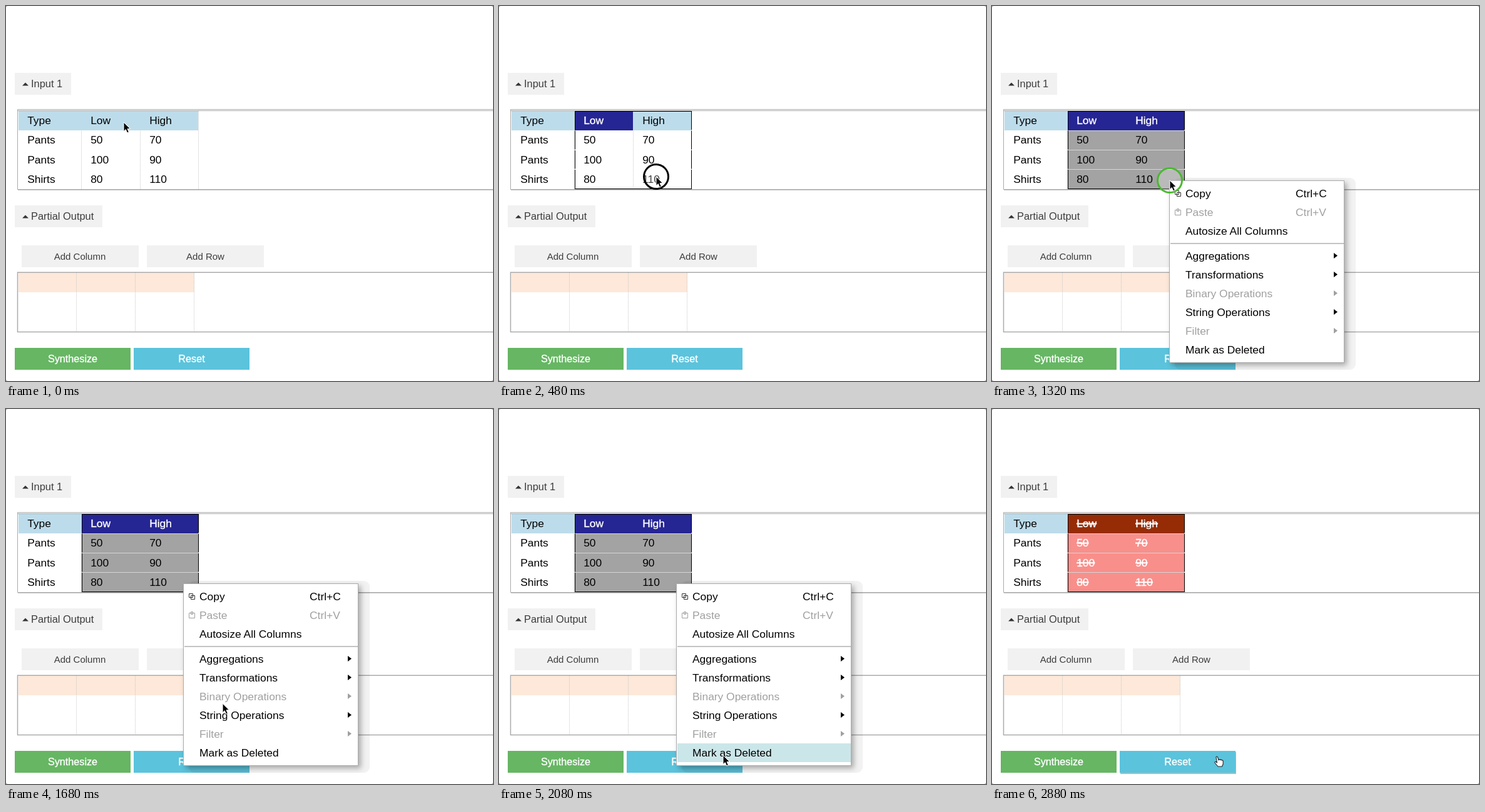
An HTML page that plays this animation: 778 by 600 pixels, repeating every 2.92 s.

```html
<!DOCTYPE html>
<html lang="en">
<head>
<meta charset="utf-8">
<title>Mark columns as deleted</title>
<style>
html, body { margin: 0; width: 100%; height: 100%; overflow: hidden; background: #fff; }
svg { display: block; width: 778px; height: 600px; font: 17.4px "Liberation Sans", Arial, sans-serif; }
.label { font-size: 16.4px; fill: #3c3c3c; }
.add { font-size: 15px; fill: #3c3c3c; text-anchor: middle; }
.action { font-size: 16.2px; fill: #fff; stroke: #fff; stroke-width: .35px; text-anchor: middle; }
.dots { stroke: #c9c9c9; stroke-dasharray: 1 1; }
.frame { fill: none; stroke: #aaa; }
.off { fill: #a0a0a0; }
.icon { fill: none; stroke: #333; }
.icon.off { stroke: #a0a0a0; }
.cell { fill: none; }
.head { fill: #bddceb; }
.rowline { stroke: none; }
#outline { fill: none; stroke: #000; visibility: hidden; }

[data-state=drag] .head.low, [data-state=selected] .head.picked { fill: #252594; }
[data-state=drag] .title.low, [data-state=selected] .title.picked,
[data-state=deleted] text.picked { fill: #fff; stroke: #fff; stroke-width: .35px; }
[data-state=selected] .cell.picked { fill: #a3a3a3; }
[data-state=deleted] .head.picked { fill: #952c06; }
[data-state=deleted] .cell.picked { fill: #f88f8b; }
[data-state=deleted] text.picked { text-decoration: line-through; }
[data-state=selected] .rowline, [data-state=deleted] .rowline { stroke: #d6d6d6; }
[data-state=drag] #outline, [data-state=selected] #outline, [data-state=deleted] #outline { visibility: visible; }
</style>
</head>
<body>
<svg id="stage" viewBox="0 0 778 600" data-state="idle">
  <defs>
    <filter id="drop" x="-10%" y="-10%" width="125%" height="125%">
      <feDropShadow dx="4" dy="4" stdDeviation="4" flood-opacity=".3"/>
    </filter>
  </defs>
  <rect width="778" height="600" fill="#999"/>
  <rect width="778" height="600" rx="3" fill="#fff"/>

  <path fill="#f1f1f1" d="M14 107h90v35h-90zM14 319h140v35h-140zM25 383h187v35h-187zM225 383h187v35h-187z"/>
  <path fill="#333" d="M26 127.5l5-5 5 5zM26 339.5l5-5 5 5z"/>
  <text class="label" x="40" y="130">Input 1</text>
  <text class="label" x="40" y="342">Partial Output</text>
  <text class="add" x="118" y="406">Add Column</text>
  <text class="add" x="318.5" y="406">Add Row</text>

  <path class="frame" d="M778 165.5H18.500V293.500H778M19 167.5H778M19 294.2H778"/>
  <g id="input"></g>
  <path id="outline"/>

  <rect x="20" y="427" width="281" height="31" fill="#fde8d9"/>
  <path class="dots" d="M112.500 427V521M206.500 427V521M300.500 427V521"/>
  <path class="frame" d="M778 426.2H18.500V521.500H778" stroke-width="1.500"/>

  <rect x="14" y="547" width="185" height="35" fill="#66b663"/>
  <rect id="resetShade" x="205" y="549" width="185" height="35" fill="#b4b9bb"/>
  <rect x="204" y="547" width="185" height="35" fill="#5bc3dc"/>
  <text class="action" x="106.500" y="570">Synthesize</text>
  <text class="action" x="296.500" y="570">Reset</text>

  <g id="menu">
    <rect x="292" y="275" width="289" height="307" rx="9" opacity=".05"/>
    <rect x="283.500" y="279.500" width="279" height="291" fill="#fff" stroke="#aaa" filter="url(#drop)"/>
    <rect id="hover" x="285" width="277" height="30" fill="#cbe6e9"/>
    <path d="M285 380H562" stroke="#c4c4c4" stroke-width="2"/>
    <path class="icon" d="M292.500 295.500h6v6h-6zM295.500 298.500h6v6h-6z"/>
    <path class="icon off" d="M292.500 326.500h9v8h-9zM295.500 324.500h3v4h-3z"/>
    <g id="items"></g>
  </g>

  <circle id="ring" r="19.500" fill="#fff" fill-opacity=".25" stroke-width="3"/>
  <path id="arrow" d="M0 0V14.500L3.300 11.500L5.600 17L8.300 15.800L6 10.500H10.500Z" stroke="#fff"/>
  <path id="hand" fill="#fff" stroke="#222" stroke-width="1.100" stroke-linejoin="round"
    d="M0 1Q1-1 2.500 1L4 6V5Q5.500 4 6.500 5.500Q8 4.500 9 6Q11 5.500 11.200 8V12L9.500 16H3L-2 10Q-2.500 8 0 8.500L1.500 10Z"/>
</svg>
<script>
const LOOP = 2920, PRESS = 120, RELEASE = 560, MENU_OPEN = 1280, MENU_CLOSE = 2320;
const $ = id => document.getElementById(id);
const show = (id, on) => $(id).setAttribute('visibility', on ? 'visible' : 'hidden');

const columns = [
  { name: 'low', left: 121, right: 214, textX: 135.2, values: ['Low', 50, 100, 80] },
  { name: 'high', left: 214, right: 307, textX: 229.2, values: ['High', 70, 90, 110] },
];
const rowTops = [168, 199, 230.500, 261.500, 293];

function buildInput() {
  const type = { name: 'type', left: 20, right: 121, textX: 34.2, values: ['Type', 'Pants', 'Pants', 'Shirts'] };
  let cells = '', texts = '';
  for (const col of [type, ...columns]) {
    const picked = col === type ? '' : 'picked';
    col.values.forEach((value, row) => {
      const y = rowTops[row];
      cells += `<rect class="${row ? 'cell' : 'head'} ${col.name} ${picked}" x="${col.left}" y="${y}"
        width="${col.right - col.left}" height="${rowTops[row + 1] - y}"/>`;
      texts += `<text class="${row ? '' : 'title'} ${col.name} ${picked}" x="${col.textX}" y="${y + 21}">${value}</text>`;
    });
  }
  const dots = [120.5, 214.5, 307.5].map(x => `M${x} 168V293`).join('');
  const lines = [199.5, 230.5, 261.5].map(y => `M122 ${y}H307`).join('');
  $('input').innerHTML = `<path class="dots" d="${dots}"/>${cells}<path class="rowline" d="${lines}"/>${texts}`;
}

const items = [
  { y: 300, text: 'Copy', keys: 'Ctrl+C' },
  { y: 330, text: 'Paste', keys: 'Ctrl+V', off: true },
  { y: 360, text: 'Autosize All Columns' },
  { y: 400, text: 'Aggregations', sub: true },
  { y: 430, text: 'Transformations', sub: true },
  { y: 460, text: 'Binary Operations', sub: true, off: true },
  { y: 490, text: 'String Operations', sub: true },
  { y: 520, text: 'Filter', sub: true, off: true },
  { y: 550, text: 'Mark as Deleted' },
];

function buildMenu() {
  $('items').innerHTML = items.map(({ y, text, keys, sub, off }) => `<g class="${off ? 'off' : ''}">
    <text x="309" y="${y + 6}">${text}</text>
    ${keys ? `<text x="485" y="${y + 6}">${keys}</text>` : ''}
    ${sub ? `<path d="M546 ${y - 5}l6 4.5-6 4.5z"/>` : ''}</g>`).join('');
}

// Pointer stops: time, x, y
const path = [
  [PRESS, 188, 186], [440, 251, 273], [840, 252, 274], [1000, 284, 279],
  [1400, 284, 279], [1760, 355, 499], [1800, 355, 499], [2080, 358, 554], [LOOP, 358, 554],
];

function pointerAt(t) {
  const next = path.findIndex(stop => stop[0] > t);
  if (next < 1) return path[0].slice(1);
  const [t0, x0, y0] = path[next - 1], [t1, x1, y1] = path[next];
  const u = (t - t0) / (t1 - t0), k = u * u * (3 - 2 * u);
  return [x0 + (x1 - x0) * k, y0 + (y1 - y0) * k];
}

const clicks = [
  { from: PRESS, to: RELEASE, color: '#000' },
  { from: 1240, to: 1400, color: '#49b92f' },
  { from: 2200, to: MENU_CLOSE, color: '#000' },
];

function drawOutline(x, y, dragging) {
  const right = dragging && x < 214 ? 214.5 : 307.5;
  const bottom = dragging ? rowTops.find(top => top > y) : 293;
  let d = `M121 168.5H${right + .5}M121 ${bottom - .5}H${right + .5}`;
  rowTops.slice(0, -1).forEach((top, row) => {
    if (top < bottom) for (const edge of [121.5, right]) d += `M${edge} ${top + .5}V${rowTops[row + 1] - 1}`;
  });
  $('outline').setAttribute('d', d);
}

function render(now) {
  const t = now % LOOP;
  const [x, y] = pointerAt(t);
  const state = t < PRESS ? 'idle' : t < RELEASE ? 'drag' : t < MENU_CLOSE ? 'selected' : 'deleted';
  $('stage').dataset.state = state;
  drawOutline(x, y, state === 'drag');

  const open = t >= MENU_OPEN && t < MENU_CLOSE;
  const item = items.find(entry => Math.abs(entry.y - y) < 15);
  const hovered = open && item && !item.off;
  show('menu', open);
  show('hover', hovered);
  if (hovered) $('hover').setAttribute('y', item.y - 15);

  const click = clicks.find(c => t >= c.from && t < c.to);
  show('ring', click);
  if (click) {
    $('ring').setAttribute('stroke', click.color);
    $('ring').setAttribute('transform', `translate(${x} ${y})`);
  }

  const overReset = state === 'deleted';
  show('resetShade', overReset);
  show('hand', overReset);
  show('arrow', !overReset);
  $('arrow').setAttribute('transform', `translate(${x} ${y})`);
  $('hand').setAttribute('transform', `translate(${x} ${y + 2})`);
  requestAnimationFrame(tick);
}

let start;
function tick(now) {
  start ??= now;
  render(now - start);
}

buildInput();
buildMenu();
render(0);
</script>
</body>
</html>
```
